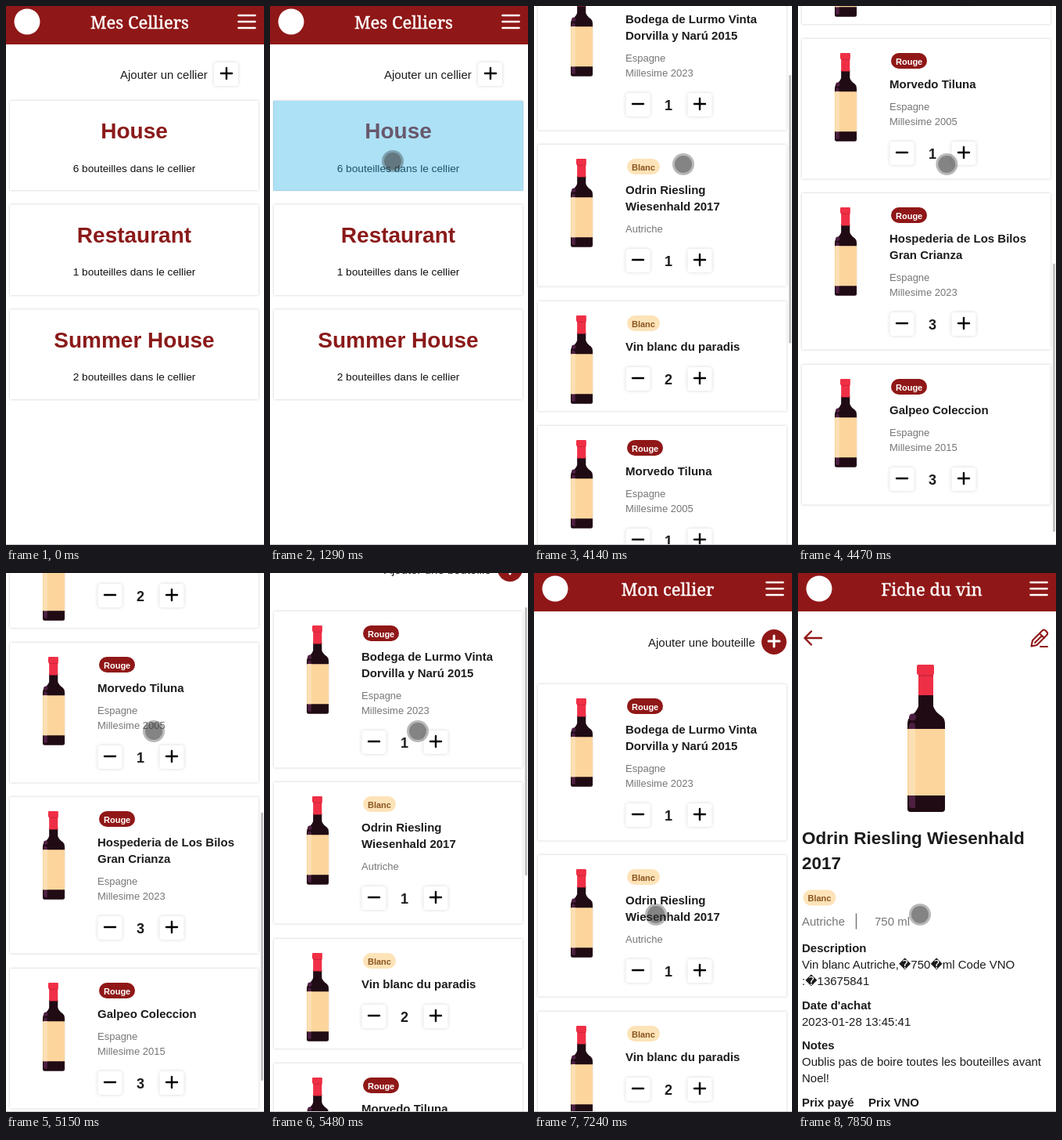
These frames come from a looping animation (330x688 px, 8000 ms). An HTML page:

```html
<!DOCTYPE html>
<html lang="fr">
<head>
<meta charset="utf-8">
<title>Mes Celliers</title>
<style>
  html, body { margin: 0; height: 100%; overflow: hidden; background: #fff; }
  svg { display: block; width: 330px; height: 688px; }
  text { font-family: "Liberation Sans", Arial, "DejaVu Sans", sans-serif; white-space: pre; }
  .title { font-family: "Noto Serif", serif; stroke: #fff; stroke-width: .45px; }
  .card { fill: #fff; filter: drop-shadow(0 0 1.5px rgba(0, 0, 0, .22)); }
  .key { fill: #fff; filter: drop-shadow(0 0 2px rgba(0, 0, 0, .16)); }
</style>
</head>
<body>
<svg id="stage" viewBox="0 0 330 688">
  <defs>
    <g id="bottle">
      <path fill="#200b14" d="M15 36H34V53Q36 60 45 66Q49 69 49 76V184Q49 188 45 188H5Q1 188 1 184V76Q1 69 5 66Q13 60 15 53Z"/>
      <path fill="#4d1f42" d="M3 79Q3 74 7 74Q11 74 11 79V183H6Q3 183 3 179Z"/>
      <circle cx="7.5" cy="67" r="4.5" fill="#4d1f42"/>
      <path fill="#fcd59d" d="M1 82H49V167H1Z"/>
      <path fill="#fce0b5" d="M3 82H11V167H3Z"/>
      <path fill="#ef2f45" d="M15 11H34V39H15Z"/>
      <path fill="#d2263c" d="M15 12H34V15H15Z"/>
      <rect x="13" width="22" height="13" rx="2" fill="#ef2f45"/>
    </g>
  </defs>
</svg>
<script>
const LOOP = 8000, MAX_SCROLL = 700;
const RED = '#901717', INK = '#1c1c1e', GREY = '#777';
const stage = document.getElementById('stage');

const text = (x, y, str, size = 15, fill = INK, extra = '') =>
  `<text x="${x}" y="${y}" font-size="${size}" fill="${fill}" ${extra}>${str}</text>`;
const bold = (x, y, str, size = 15, fill = INK, extra = '') =>
  text(x, y, str, size, fill, 'font-weight="700" ' + extra);
const rect = (cls, x, y, w, h, r = 1) =>
  `<rect class="${cls}" x="${x}" y="${y}" width="${w}" height="${h}" rx="${r}"/>`;
const line = (d, stroke = '#000', width = 2.4) =>
  `<path d="${d}" fill="none" stroke="${stroke}" stroke-width="${width}" stroke-linecap="round" stroke-linejoin="round"/>`;
const minus = (x, y) => line(`M${x - 7} ${y}h14`);
const plus = (x, y, color, width) => line(`M${x - 7} ${y}h14M${x} ${y - 7}v14`, color, width);
const late = s => `<g class="late">${s}</g>`;
const bottle = (x, y, scale) => `<use href="#bottle" transform="translate(${x} ${y}) scale(${scale})"/>`;
const middle = 'text-anchor="middle"';

const header = title =>
  `<rect width="330" height="49" fill="${RED}"/><circle cx="27" cy="20" r="16.5" fill="#fff"/>` +
  line('M297.5 12h21M297.5 20h21M297.5 28h21', '#fff', 2.7) +
  late(text(171, 29, title, 22, '#fff', 'class="title" ' + middle));

function pill(x, y, kind) {
  const red = kind === 'Rouge';
  return `<rect x="${x}" y="${y}" width="${red ? 46 : 42}" height="20" rx="10" fill="${red ? RED : '#fde3b8'}"/>` +
    bold(x + 6, y + 14.5, kind, 11, red ? '#fff' : '#8a5420');
}

function cellarList() {
  const cellars = [['House', 6, 121, 114], ['Restaurant', 1, 253.5, 115.5], ['Summer House', 2, 387.5, 114.5]];
  return header('Mes Celliers') + text(146, 93, 'Ajouter un cellier') +
    rect('key', 266, 72, 31, 30, 4) + plus(282, 86) +
    cellars.map(([name, n, y, h]) => rect('card', 5, y, 318, h) +
      bold(164, Math.round(y + 48), name, 28, '#8b1a1a', middle) +
      text(164, Math.round(y + 90.5), n + ' bouteilles dans le cellier', 13.7, '#111', middle)).join('');
}

const wines = [
  ['Rouge', ['Bodega de Lurmo Vinta', 'Dorvilla y Narú 2015'], ['Espagne', 'Millesime 2023'], 1],
  ['Blanc', ['Odrin Riesling', 'Wiesenhald 2017'], ['Autriche'], 1],
  ['Blanc', ['Vin blanc du paradis'], [], 2],
  ['Rouge', ['Morvedo Tiluna'], ['Espagne', 'Millesime 2005'], 1],
  ['Rouge', ['Hospederia de Los Bilos', 'Gran Crianza'], ['Espagne', 'Millesime 2023'], 3],
  ['Rouge', ['Galpeo Coleccion'], ['Espagne', 'Millesime 2015'], 3]
];

function wineList() {
  let top = 141.7, out = header('Mon cellier') + text(146, 94, 'Ajouter une bouteille') +
    `<circle cx="307" cy="88" r="16" fill="${RED}"/>` + late(plus(307, 87, '#fff', 3));
  for (const [kind, names, notes, count] of wines) {
    const y0 = Math.round(top);
    let y = y0 + 63, body = '';
    names.forEach((s, i) => body += bold(117, y + 21 * i, s));
    y += 21 * (names.length - 1);
    notes.forEach((s, i) => body += text(117, y + 28 + 19 * i, s, 13, GREY));
    if (notes.length) y += 9 + 19 * notes.length;
    y += 36;
    const height = Math.max(140, y + 32.5 - y0);
    out += rect('card', 5, y0, 318, height) + bottle(46.4, y0 + 18, '.585 .6') + pill(119, y0 + 18, kind) + body +
      rect('key', 117.5, y - 15, 31, 30, 4) + rect('key', 196.5, y - 15, 31, 30, 4) +
      bold(172, y + 7, count, 18, INK, middle) + late(minus(133, y - 1) + plus(212, y - 1));
    top += height + 19;
  }
  return out;
}

function wineSheet() {
  return header('Fiche du vin') +
    line('M30 83H9M17 74.5L8.5 83L17 91.5', RED) +
    late(line('M298.5 93.5L300 86L312.5 73.5Q314.5 71.5 316.5 73.5L318.5 75.5Q320 77.5 318 79.5L305.5 92ZM309 77L315 83M303 89L312 80M310 94H319', RED, 2.1) +
      bottle(139, 117, 1)) +
    bold(5, 346, 'Odrin Riesling Wiesenhald', 22.5) + bold(5, 378, '2017', 22.5) + pill(6.5, 404.5, 'Blanc') +
    text(5, 450, 'Autriche', 15, GREY) + line('M74.5 435V454', GREY, 1.5) + text(98, 450, '750 ml', 15, GREY) +
    bold(5, 484, 'Description') + text(5, 505, 'Vin blanc Autriche,\uFFFD750\uFFFDml Code VNO') +
    text(5, 526, ':\uFFFD13675841') +
    bold(5, 557, "Date d'achat") + text(5, 578, '2023-01-28 13:45:41') +
    bold(5, 608, 'Notes') + text(5, 629, 'Oublis pas de boire toutes les bouteilles avant') + text(5, 650, 'Noel!') +
    bold(5, 681, 'Prix payé') + bold(90, 681, 'Prix VNO');
}

stage.insertAdjacentHTML('beforeend',
  [cellarList, wineList, wineSheet].map(page => `<g class="page">${page()}</g>`).join('') +
  `<rect id="tap" x="4" width="320" fill="rgb(51,181,229)"/>
   <rect id="bar" x="326" width="3" height="342" fill="#c1c1c1"/>
   <path d="M0 687.5H330" stroke="#c8c8c8"/>
   <g id="cursor"><circle r="14" fill="#000" fill-opacity=".28"/><circle r="11" fill="#444" fill-opacity=".45"/></g>`);

const pages = [...document.querySelectorAll('.page')];
const lates = pages.map(p => [...p.querySelectorAll('.late')]);
const [tap, bar, cursor] = ['tap', 'bar', 'cursor'].map(id => document.getElementById(id));

// Pointer path: time, x, y
const path = [
  [190, 312, 637], [260, 311, 540], [400, 300, 400], [500, 280, 283], [600, 205, 215], [680, 157, 198],
  [3110, 157, 198], [3180, 163, 216], [3450, 172, 250], [3870, 191, 202], [4140, 191, 202], [5150, 189, 202],
  [6160, 189, 202], [6230, 180, 170], [6300, 169, 233], [6450, 125, 400], [6600, 190, 530], [6760, 290, 490],
  [6970, 156, 436], [LOOP, 156, 436]
];
const ramp = (t, a, b) => Math.min(1, Math.max(0, (t - a) / (b - a)));
const ease = u => (1 - Math.cos(Math.PI * u)) / 2;
const show = (el, on) => el.style.display = on ? '' : 'none';

function draw(now) {
  const t = Math.floor(now % LOOP / 10) * 10; // 10 ms steps keep fast scrolling steady
  const current = t < 1680 ? 0 : t < 7500 ? 1 : 2;
  const ready = t >= [0, 1950, 7780][current];
  pages.forEach((p, i) => show(p, i === current));
  lates[current].forEach(el => show(el, ready));

  const scroll = MAX_SCROLL * (ease(ramp(t, 3932, 4540)) - ease(ramp(t, 5029, 5620)));
  pages[1].setAttribute('transform', `translate(0 ${-Math.round(scroll)})`);
  bar.setAttribute('y', .487 * scroll - 1);
  bar.setAttribute('opacity', t < 3960 ? 0 : 1 - ramp(t, 5940, 6080));

  const press = t < 4000 ? 1220 : 7040;
  tap.setAttribute('y', press === 1220 ? 121 : 360);
  tap.setAttribute('height', press === 1220 ? 115 : 182);
  tap.setAttribute('opacity', t < press ? 0 : .4 * (1 - ramp(t, press + 130, press + 200)));

  show(cursor, t >= 190);
  const i = Math.max(1, path.findIndex(p => p[0] > t));
  const [t0, x0, y0] = path[i - 1], [t1, x1, y1] = path[i], u = ramp(t, t0, t1);
  cursor.setAttribute('transform', `translate(${x0 + (x1 - x0) * u} ${y0 + (y1 - y0) * u})`);
}

function tick() {
  draw(performance.now());
  requestAnimationFrame(tick);
}
tick();
</script>
</body>
</html>
```
